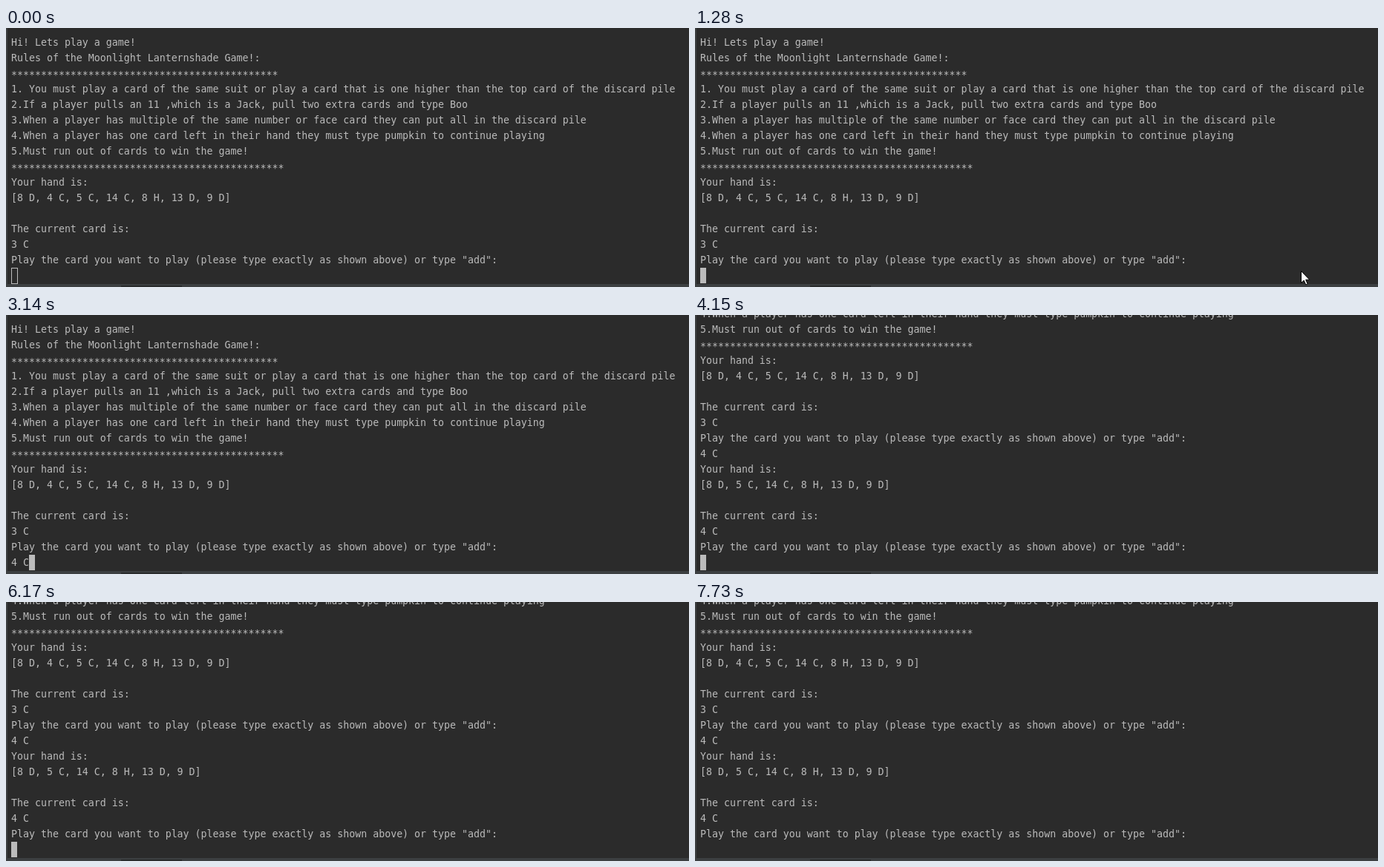
An HTML page with a canvas for the animation above (8 s loop, 920x350 px).

```html
<!DOCTYPE html>
<html lang="en">
<head>
<meta charset="utf-8">
<title>Card game console</title>
<style>
html, body { margin: 0; width: 100%; height: 100%; overflow: hidden; background: #2b2b2b; }
canvas { display: block; }
</style>
</head>
<body>
<canvas id="stage" width="920" height="350"></canvas>
<script>
const ctx = document.getElementById('stage').getContext('2d');
const LOOP = 8000, LEFT = 7, TOP = 9, CELL = 8, ROW = 21;
const INK = '#bbbbbb';

const prompt = card => [
  '', 'The current card is:', card,
  'Play the card you want to play (please type exactly as shown above) or type "add":'
];
const intro = [
  'Hi! Lets play a game!',
  'Rules of the Moonlight Lanternshade Game!:',
  '*'.repeat(45),
  '1. You must play a card of the same suit or play a card that is one higher than the top card of the discard pile',
  '2.If a player pulls an 11 ,which is a Jack, pull two extra cards and type Boo',
  '3.When a player has multiple of the same number or face card they can put all in the discard pile',
  '4.When a player has one card left in their hand they must type pumpkin to continue playing',
  '5.Must run out of cards to win the game!',
  '*'.repeat(46),
  'Your hand is:',
  '[8 D, 4 C, 5 C, 14 C, 8 H, 13 D, 9 D]',
  ...prompt('3 C')
];
const nextTurn = [
  ...intro, '4 C',
  'Your hand is:',
  '[8 D, 5 C, 14 C, 8 H, 13 D, 9 D]',
  ...prompt('4 C')
];

// Each entry: start time, typed text, caret style
const typing = [
  [0, '', 'box'], [960, '', 'block'],
  [1980, '4', 'block'], [2530, '4', 'off'],
  [2910, '4 ', 'block'], [3140, '4 C', 'block'],
  [4150, '', 'block'], [4610, '', 'off'],
  [5160, '', 'block'], [5620, '', 'off'],
  [6170, '', 'block'], [6630, '', 'off'],
  [7190, '', 'block'], [7730, '', 'off']
];

function rect(x, y, w, h, color) {
  ctx.fillStyle = color;
  ctx.fillRect(x, y, w, h);
}

function drawLine(text, row) {
  const drop = text[0] === '*' ? 2 : 0;
  ctx.fillStyle = INK;
  ctx.fillText(text, LEFT, TOP + row * ROW + 15 + drop);
}

function drawCaret(style, col) {
  const x = LEFT + col * CELL, y = TOP + 15 * ROW;
  if (style === 'block') rect(x, y, CELL, ROW, INK);
  if (style === 'box') {
    ctx.strokeStyle = INK;
    ctx.lineWidth = 1;
    ctx.strokeRect(x + 0.5, y + 0.5, CELL, ROW);
  }
}

function drawFrame() {
  rect(0, 0, 2, 350, '#3c3f41');
  rect(0, 346, 920, 4, '#3c3f41');
  rect(155, 348, 82, 2, '#292b2c');
}

// The pointer follows a curved path in short jumps
function pointerAt(t) {
  if (t < 500 || t >= 1350) return null;
  const p = Math.min(1, Math.floor((t - 500) / 78) / 5), q = 1 - p;
  return {
    x: Math.round(q * q * 871 + 2 * p * q * 848 + p * p * 816),
    y: Math.round(q * q * 342 + 2 * p * q * 297 + p * p * 328)
  };
}

function drawPointer({ x, y }) {
  const shape = [[0, 0], [0, 16], [3.7, 12.6], [6.3, 18.4], [8.7, 17.4], [6.2, 11.7], [11.3, 11.7]];
  ctx.beginPath();
  shape.forEach(([dx, dy]) => ctx.lineTo(x + 0.5 + dx, y + 0.5 + dy));
  ctx.closePath();
  ctx.fillStyle = '#ffffff';
  ctx.fill();
  ctx.strokeStyle = '#000000';
  ctx.lineWidth = 1;
  ctx.stroke();
}

function draw(t) {
  rect(0, 0, 920, 350, '#2b2b2b');
  ctx.font = '13.288px "DejaVu Sans Mono", "Noto Sans Mono", monospace';
  ctx.textBaseline = 'alphabetic';
  const lines = t < 4150 ? intro : nextTurn;
  const scroll = lines.length - 15;
  lines.forEach((text, i) => drawLine(text, i - scroll));

  const [, typed, style] = typing.filter(step => step[0] <= t).pop();
  drawLine(typed, 15);
  drawCaret(style, typed.length);
  drawFrame();

  const pointer = pointerAt(t);
  if (pointer) drawPointer(pointer);
}

const start = performance.now();
function tick(now) {
  draw(Math.max(0, now - start) % LOOP);
  requestAnimationFrame(tick);
}
draw(0);
requestAnimationFrame(tick);
</script>
</body>
</html>
```
